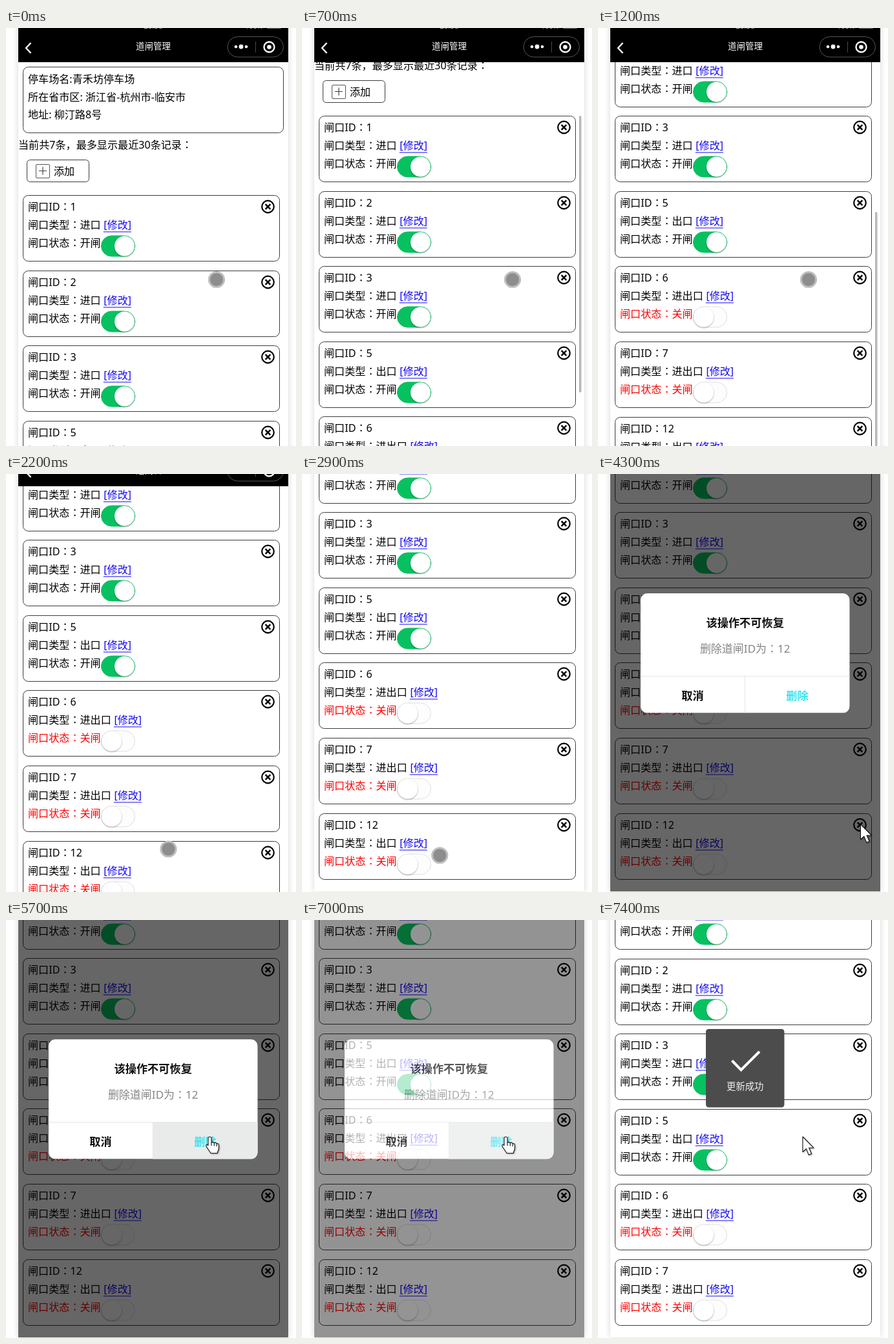
An HTML page that plays this animation: 449 px wide and 648 px high, repeating every 8 s.

```html
<!DOCTYPE html>
<html lang="zh-CN">
<head>
<meta charset="utf-8">
<title>道闸管理</title>
<style>
html, body { margin: 0; width: 100%; height: 100%; overflow: hidden; background: #fff; }
#stage { position: relative; width: 449px; height: 648px; overflow: hidden; }
#phone { position: absolute; left: 19px; top: -40px; width: 418px; height: 764px;
  background: #fff; box-shadow: 0 0 9px rgba(0,0,0,.17); overflow: hidden; }
svg { position: absolute; left: 0; top: 0; display: block; }
text { font: 16.1px "Noto Sans", "Noto Sans CJK SC", "Noto Sans CJK", sans-serif; white-space: pre; }
.colon { font-family: "Noto Sans CJK JP", "Noto Sans CJK SC", sans-serif; }
.box { fill: #fff; stroke: #3c3c3c; }
.link { fill: #1408f5; }
.off { fill: #f00; }
.mid { text-anchor: middle; }
.bold { font-size: 17.2px; font-weight: 700; }
#pointer { filter: drop-shadow(1.5px 1.5px 1px rgba(0,0,0,.35)); }
#pointer path { fill: #fff; stroke: #111; stroke-width: 1.1; stroke-linejoin: round; }
</style>
</head>
<body>
<div id="stage">
  <div id="phone"></div>
  <svg width="449" height="648">
    <circle id="touch" r="11.6" fill="#8d8d8d" stroke="#bebebe" stroke-width="3"/>
    <g id="pointer">
      <path id="arrow" d="M0 0V23.5L5.4 18.6L9.3 28.3L13.6 26.5L9.7 17.2H16.8Z"/>
      <path id="hand" d="M-2.5 1.5Q0-1.5 2.5 1.5V9Q5 7.4 6.8 9.6Q9.4 8.2 10.8 10.7Q14 10.2 14 13.6V18.5L11.6 25.5H1.6L-5.6 14.8Q-6.2 10.8-2.5 13.4ZM2.5 9V14M6.8 10V14.5M10.8 11V15"/>
    </g>
  </svg>
</div>
<script>
const $ = id => document.getElementById(id);
const LOOP = 8000, STEP = 100, PITCH = 116.6, MAX_SCROLL = 356;

const text = (x, y, s, cls = '', attrs = '') =>
  `<text x="${x}" y="${y}" class="${cls}" ${attrs}>${
    s.replace(/：/g, '<tspan class="colon" lang="ja">：</tspan>')}</text>`;
const rect = (x, y, w, h, r, attrs) =>
  `<rect x="${x}" y="${y}" width="${w}" height="${h}" rx="${r}" ${attrs}/>`;
const line = (d, color, width = 1) =>
  `<path d="${d}" fill="none" stroke="${color}" stroke-width="${width}"/>`;

const toggle = on =>
  rect(147.5, 63, 52, 32, 16, on ? 'fill="#07c160" stroke="#07c160"' : 'fill="#fdfdfd" stroke="#dfdfdf"') +
  `<circle cx="${on ? 183.5 : 163.5}" cy="79" r="15.5" fill="#fff" filter="url(#soft)"/>`;

function card([id, type, on], i) {
  const x = 34 + 16.1 * (5 + type.length) + 4.6;
  return `<g id="gate${id}" transform="translate(0 ${Math.round(259 + PITCH * i)})">` +
    rect(26.5, .5, 397, 102, 8, 'class="box"') +
    text(34, 24.3, '闸口ID：' + id) +
    text(34, 52.2, '闸口类型：' + type) +
    text(x, 52.2, '[修改]', 'link') +
    line(`M${x - .5} 57h43`, '#1408f5') +
    text(34, 79.8, '闸口状态：' + (on ? '开闸' : '关闸'), on ? '' : 'off') +
    toggle(on) +
    '<circle cx="405.5" cy="18" r="9.3" fill="none" stroke="#000" stroke-width="2.2"/>' +
    line('M401.7 14.2l7.6 7.6m0-7.6l-7.6 7.6', '#000', 2.5) + '</g>';
}

const gates = [
  [1, '进口', 1], [2, '进口', 1], [3, '进口', 1], [5, '出口', 1],
  [6, '进出口', 0], [7, '进出口', 0], [12, '出口', 0]
];

const list =
  rect(26.5, 60.5, 403, 102, 8, 'class="box"') +
  text(34, 85, '停车场名:青禾坊停车场') +
  text(34, 112.6, '所在省市区: 浙江省-杭州市-临安市') +
  text(34, 140.2, '地址: 柳汀路8号') +
  text(19, 187, '当前共7条，最多显示最近30条记录：') +
  rect(32.5, 204.5, 96, 34, 5, 'class="box"') +
  rect(46.5, 211.5, 21, 21, 1.5, 'fill="none" stroke="#555"') +
  line('M51 221.5h12m-6-6v12', '#444', 1.2) +
  text(74, 227.6, '添加') +
  gates.map(card).join('');

const header =
  rect(19, -40, 418, 93, 0, 'fill="#000"') +
  text(228, 1, '20:58', 'mid', 'fill="#bbb" style="font-size:11.5px"') +
  text(384, 1, '100%', 'mid', 'fill="#bbb" style="font-size:11px"') +
  rect(404, -9, 22, 9.5, 1, 'fill="#ddd"') +
  line('M38.5 23l-7.5 8l7.5 8', '#fff', 2.4) +
  text(228, 32.6, '道闸管理', 'mid', 'fill="#fff" style="font-size:13.5px"') +
  rect(343, 13.5, 86.5, 31.5, 15.7, 'fill="#000" stroke="#555"') +
  line('M386.5 21v17', '#4a4a4a') +
  [[356, 2.3], [364, 3.4], [372, 2.3]].map(([x, r]) => `<circle cx="${x}" cy="29" r="${r}" fill="#fff"/>`).join('') +
  '<circle cx="407.5" cy="29.5" r="8" fill="none" stroke="#fff" stroke-width="2.3"/>' +
  '<circle cx="407.5" cy="29.5" r="3.3" fill="#fff"/>';

const dialog =
  rect(19, -117, 418, 764, 0, 'fill="#000" fill-opacity=".6"') +
  '<g clip-path="url(#dialogClip)">' +
  rect(66, 185, 324, 185.5, 0, 'fill="#fff"') +
  rect(228, 314, 162, 57, 0, 'id="pressed" fill="#e9ebeb"') +
  line('M66 313.5h324M227.5 314v57', '#e6e6e6') + '</g>' +
  text(227.7, 237.4, '该操作不可恢复', 'mid bold', 'fill="#111"') +
  text(227.7, 277, '删除道闸ID为：12', 'mid', 'fill="#858585" style="font-size:17px;font-weight:300"') +
  text(146.5, 349.6, '取消', 'mid bold', 'fill="#111"') +
  text(308.5, 349.6, '删除', 'mid bold', 'fill="#3fe3ef"');

const toast =
  rect(167, 169, 121.5, 121.5, 4.5, 'fill="#4c4c4c"') +
  line('M207.5 218l14 14.5L250 204', '#fff', 4) +
  text(227.7, 263.2, '更新成功', 'mid', 'fill="#f0f0f0" style="font-size:14.3px"');

$('phone').innerHTML = `<svg width="418" height="764" viewBox="19 -40 418 764">
  <defs>
    <clipPath id="bodyClip"><rect x="19" y="53" width="418" height="671"/></clipPath>
    <clipPath id="dialogClip"><rect x="66" y="185" width="323.5" height="185.5" rx="10"/></clipPath>
    <filter id="soft" x="-30%" y="-30%" width="160%" height="160%">
      <feDropShadow dx="0" dy="1" stdDeviation="1.2" flood-opacity=".4"/>
    </filter>
  </defs>
  <g clip-path="url(#bodyClip)"><g id="list">${list}</g>
    ${rect(429, 0, 3.5, 429, 1.7, 'id="bar" fill="#b8b8b8"')}</g>
  ${header}
  <g transform="translate(0 77)"><g id="dialog">${dialog}</g><g id="toast">${toast}</g></g>
</svg>`;

// Rows are [time, value, ...]; values between rows are linear.
const tracks = {
  scroll: [[400, 0], [500, 25], [700, 123], [1200, MAX_SCROLL]],
  lift: [[2000, 0], [2100, 10], [2200, 34], [2300, 62], [2400, 77]],
  touch: [[1200, 326, 390], [1300, 325, 395], [1400, 323, 398], [1500, 323, 398],
    [2200, 251.5, 581.5], [2400, 266.5, 575.5], [2600, 266.5, 575.5],
    [3200, 160, 607], [3500, 405.5, 542.5], [3700, 412, 546]],
  pointer: [[4400, 406.5, 543], [5000, 321, 347.5], [5100, 321, 347.5], [5200, 313, 342],
    [5300, 304.5, 337], [5400, 315.5, 336], [7100, 315.5, 336], [7200, 317, 336]],
  dialog: [[4000, 0], [4100, .35], [4200, .75], [4300, 1], [6900, 1], [7000, .7], [7200, 0]],
  toast: [[7200, 0], [7300, .6], [7400, 1]]
};

function at(name, t) {
  const rows = tracks[name];
  const i = rows.findIndex(r => r[0] > t);
  if (i === 0) return rows[0].slice(1);
  if (i < 0) return rows[rows.length - 1].slice(1);
  const a = rows[i - 1], b = rows[i], k = (t - a[0]) / (b[0] - a[0]);
  return a.slice(1).map((v, j) => v + (b[j + 1] - v) * k);
}

const move = (id, x, y) => $(id).setAttribute('transform', `translate(${x} ${y})`);
const show = (id, on) => $(id).style.display = on ? '' : 'none';
const fade = (id, t) => {
  const [o] = at(id, t);
  show(id, o > 0);
  $(id).style.opacity = o;
};

function draw(t) {
  const removed = t >= 7300;
  const [scroll] = at('scroll', t);
  move('list', 0, -Math.round(removed ? scroll - PITCH : scroll));
  show('gate12', !removed);
  move('bar', 0, 57.3 + scroll * .64);
  show('bar', t >= 500 && t < 1300);
  $('phone').style.transform = `translateY(${-Math.round(at('lift', t)[0])}px)`;

  fade('dialog', t);
  show('pressed', t >= 5700);
  fade('toast', t);

  const hand = t >= 5000 && t < 7200;
  move('touch', ...at('touch', t));
  show('touch', t < 3300 || t >= 3500 && t < 4000);
  move('pointer', ...at('pointer', t));
  show('pointer', t >= 4000);
  show('hand', hand);
  show('arrow', !hand);
}

let start;
function tick(now) {
  start ??= now;
  draw(Math.floor((now - start) % LOOP / STEP) * STEP);
  requestAnimationFrame(tick);
}
draw(0);
requestAnimationFrame(tick);
</script>
</body>
</html>
```
